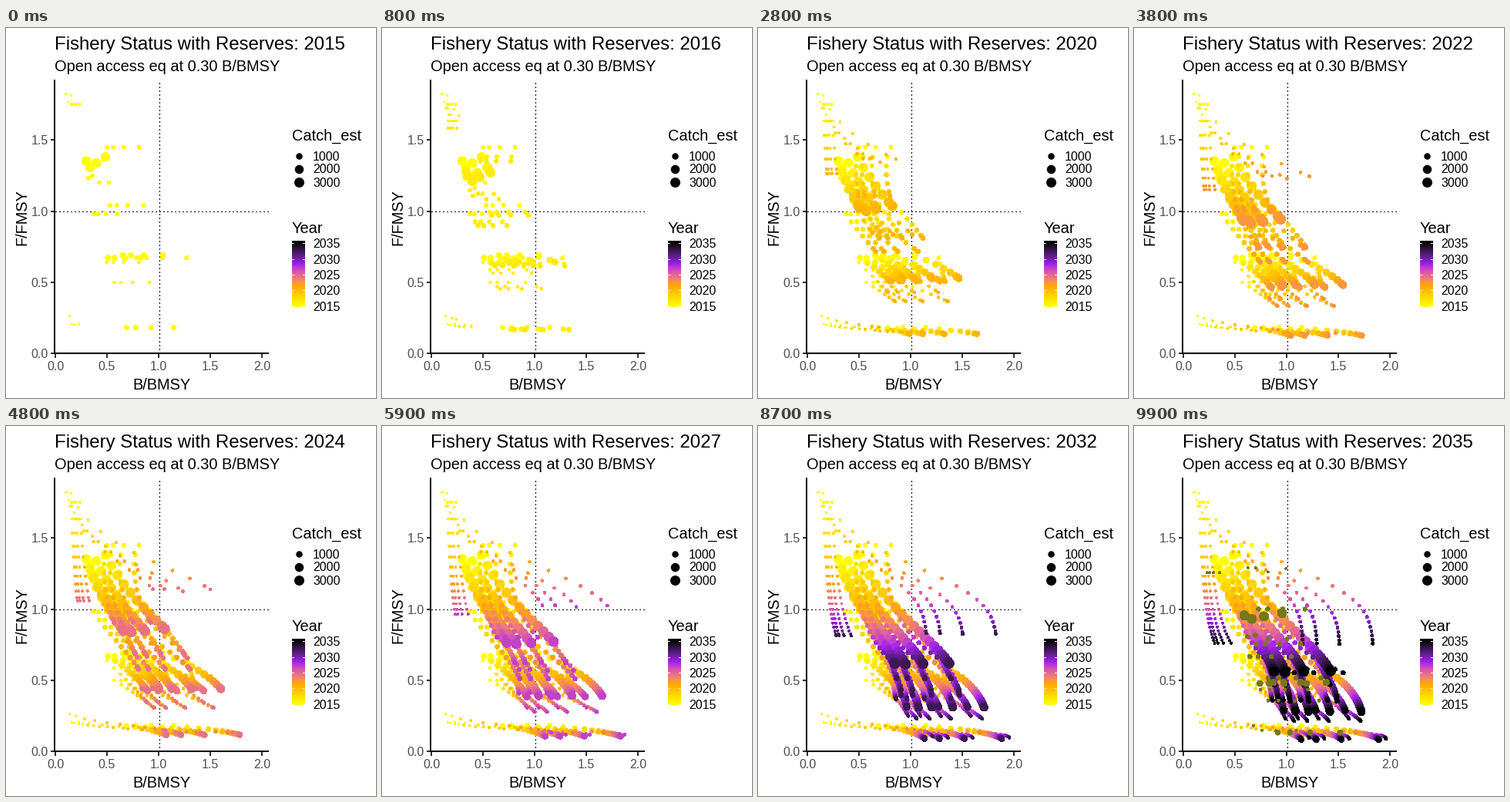
Write a matplotlib script that moves like this. It is 480 px wide and 480 px high and loops after 10 s.

```python
import numpy as np
import matplotlib.pyplot as plt
from matplotlib.animation import FuncAnimation
from matplotlib.patches import Rectangle

SIZE = 480
YEARS = np.arange(2015, 2036)
T = YEARS - YEARS[0]
LAST = len(T) - 1
FRAMES = 100
# Frames that sit halfway between two years; the last one wraps around.
BETWEEN = list(range(3, 84, 5)) + [87, 91, 95, 99]

plt.rcParams["font.family"] = "Liberation Sans"


# ---- colour scale, interpolated in Lab ----
M = np.array([[0.4124, 0.3576, 0.1805],
              [0.2126, 0.7152, 0.0722],
              [0.0193, 0.1192, 0.9505]])
WHITE = M.sum(axis=1)


def to_lab(rgb):
    rgb = np.asarray(rgb, float)
    lin = np.where(rgb > 0.04045, ((rgb + 0.055) / 1.055) ** 2.4, rgb / 12.92)
    xyz = lin @ M.T / WHITE
    f = np.where(xyz > 0.008856, np.cbrt(xyz), 7.787 * xyz + 16 / 116)
    x, y, z = np.moveaxis(f, -1, 0)
    return np.stack([116 * y - 16, 500 * (x - y), 200 * (y - z)], axis=-1)


def to_rgb(lab):
    light, a, b = np.moveaxis(np.asarray(lab, float), -1, 0)
    y = (light + 16) / 116
    f = np.stack([y + a / 500, y, y - b / 200], axis=-1)
    xyz = np.where(f > 0.2069, f ** 3, (f - 16 / 116) / 7.787) * WHITE
    lin = np.clip(xyz @ np.linalg.inv(M).T, 0, 1)
    rgb = np.where(lin > 0.0031308, 1.055 * lin ** (1 / 2.4) - 0.055, 12.92 * lin)
    return np.clip(rgb, 0, 1)


# yellow, orange, purple, black
STOPS = to_lab(np.array([[255, 255, 0], [255, 165, 0], [160, 32, 240], [0, 0, 0]]) / 255)


def year_lab(u):
    """Lab colour for a position between 0 (first year) and 1 (last year)."""
    return np.stack([np.interp(u, np.linspace(0, 1, 4), c) for c in STOPS.T], axis=-1)


# ---- stock trajectories ----
def logistic(start, cap, rate):
    return cap / (1 + (cap / start - 1) * np.exp(-rate * T))


def settle(start, cap, tau):
    return cap - (cap - start) * np.exp(-T / tau)


def dip(start):
    return start - 0.045 * (1 - np.exp(-T / 1.5)) + 0.00125 * T ** 2


EVEN = (1, 1, 1, 1)

# biomass, coefficients of 1/F, widest reserve ratio, first and last dot size, F factors
STOCKS = [
    (logistic(0.097, 1.16, 0.41), (0.549, 0.031, 0.00037), 1.586, 1.8, 4.0, (1, 1, 0.97, 0.995)),
    (logistic(0.155, 5.0, 0.035), (0.571, 0.0412, -0.0002), 1.53, 3.0, 3.0, EVEN),
    (dip(0.50), (0.690, 0.032, 0.0012), 1.62, 5.0, 5.5, EVEN),
    (logistic(0.32, 0.93, 0.25), (0.820, 0.058, 0.0016), 1.62, 4.6, 5.5, (1.01, 1.025, 0.985, 0.985)),
    (settle(0.53, 0.95, 11), (0.962, 0.046, 0.0006), 1.61, 5.0, 6.0, EVEN),
    (logistic(0.37, 0.93, 0.24), (1.020, 0.060, 0.0015), 1.62, 5.2, 6.0, EVEN),
    (settle(0.50, 1.02, 7), (1.560, 0.140, 0.0), 1.62, 3.2, 4.0, EVEN),
    (settle(0.57, 1.11, 7.5), (2.000, 0.133, 0.0), 1.60, 3.6, 4.2, EVEN),
    (settle(0.785, 0.87, 9), (1.490, 0.100, -0.0018), 1.62, 5.2, 5.5, EVEN),
    (settle(0.51, 0.99, 6), (1.490, 0.080, 0.001), 1.61, 6.8, 8.5, EVEN),
    (settle(0.655, 1.10, 6), (1.450, 0.070, 0.0018), 1.59, 7.0, 10.0, EVEN),
    (logistic(0.30, 0.95, 0.165), (0.740, 0.040, 0.0006), 1.62, 11.5, 12.5, (1, 0.967, 0.99, 1.022)),
    (logistic(0.14, 1.22, 0.42), (4.85, 0.27, 0.002), 1.61, 2.0, 4.0, (1.29, 1, 0.98, 1.01)),
    (settle(0.69, 1.15, 5.2), (5.50, 0.32, 0.0), 1.66, 5.6, 7.5, EVEN),
]
RESERVES = (0, 0.24, 0.58, 1)


def px(b):
    return 64 + 134 * b


def py(f):
    return 422.3 - 184.7 * f


def build():
    """Positions (year, dot, 2) and diameters (year, dot)."""
    xy, diam = [], []
    for bio, (a, b, c), top, d0, d1, factors in STOCKS:
        effort = 1 / (a + b * T + c * T ** 2)
        size = settle(d0, d1, 4)
        for power, factor in zip(RESERVES, factors):
            fade = 1 + (factor - 1) * np.exp(-T / 12)
            xy.append(np.column_stack([px(bio * top ** power), py(effort * fade)]))
            diam.append(size)
    return np.stack(xy, axis=1), np.stack(diam, axis=1)


XY, DIAM = build()
DOTS = XY.shape[1]
LAB = year_lab(T / LAST)

# ---- static parts ----
fig = plt.figure(figsize=(SIZE / 72, SIZE / 72), dpi=72, facecolor="white")
ax = fig.add_axes([0, 0, 1, 1])
ax.axis("off")


def put(x, y, text, size, ha="left", color="black", **kw):
    return ax.text(x, y, text, fontsize=size, ha=ha, va="baseline", color=color, **kw)


def box(x, y, w, h, color="black", z=1):
    ax.add_patch(Rectangle((x, y), w, h, facecolor=color, linewidth=0,
                           antialiased=False, zorder=z))


title = put(63, 28, "", 24)
put(63, 56, "Open access eq at 0.30 B/BMSY", 20)
put(202, 469, "B/BMSY", 20, ha="center")
put(26, 245, "F/FMSY", 20, ha="center", rotation=90, rotation_mode="anchor")

for v in (0, 0.5, 1, 1.5, 2):
    box(round(px(v)) - 1, 423, 2, 5, "#333333")
    put(px(v), 444, f"{v:.1f}", 16, ha="center", color="#4D4D4D")
    if v < 2:
        box(58, round(py(v)) - 1, 5, 2, "#333333")
        put(54.5, py(v) + 6, f"{v:.1f}", 16, ha="right", color="#4D4D4D")
box(62, 67, 2, 356)
box(62, 421, 279, 2)

dotted = dict(color="black", lw=1, dashes=(1, 3), antialiased=False, zorder=1)
ax.plot([198.5, 198.5], [422, 67], **dotted)
ax.plot([64, 341], [237.5, 237.5], **dotted)

put(371, 146, "Catch_est", 20)
for y, d, label in ((166, 8.5, 1000), (182.5, 11.5, 2000), (199.5, 13, 3000)):
    ax.scatter([379.5], [y], s=d ** 2, c="black", linewidths=0, antialiased=False)
    put(398, y + 6, str(label), 16)

put(371, 266, "Year", 20)
rows = np.arange(276, 362) + 0.5
bar = to_rgb(year_lab(np.clip((361 - rows) / 82, 0, 1)))[:, None, :]
ax.imshow(bar, extent=(371, 388, 362, 276), aspect="auto", interpolation="nearest", zorder=1)
for year in range(2015, 2036, 5):
    y = 361 - 4.1 * (year - 2015)
    for x in (371, 384.6):
        box(x, round(y) - 0.5, 3.4, 1, "white", z=2)
    put(398, y + 6, str(year), 16)

ax.set_xlim(0, SIZE)
ax.set_ylim(SIZE, 0)

dots = ax.scatter([], [], s=[], linewidths=0, antialiased=False, zorder=3)


def draw(i):
    k = sum(b < i for b in BETWEEN)
    xy = XY[:k + 1].reshape(-1, 2)
    diam = DIAM[:k + 1].ravel()
    lab = np.repeat(LAB[:k + 1], DOTS, axis=0)
    if i in BETWEEN:
        n = (k + 1) % len(T)
        xy = np.vstack([xy, (XY[k] + XY[n]) / 2])
        diam = np.append(diam, (DIAM[k] + DIAM[n]) / 2)
        lab = np.vstack([lab, np.repeat([(LAB[k] + LAB[n]) / 2], DOTS, axis=0)])
    dots.set_offsets(xy)
    dots.set_sizes(diam ** 2)
    dots.set_facecolor(to_rgb(lab))
    title.set_text(f"Fishery Status with Reserves: {YEARS[k]}")
    return dots, title


anim = FuncAnimation(fig, draw, frames=FRAMES, interval=100, repeat=True, repeat_delay=0)
plt.show()
```
